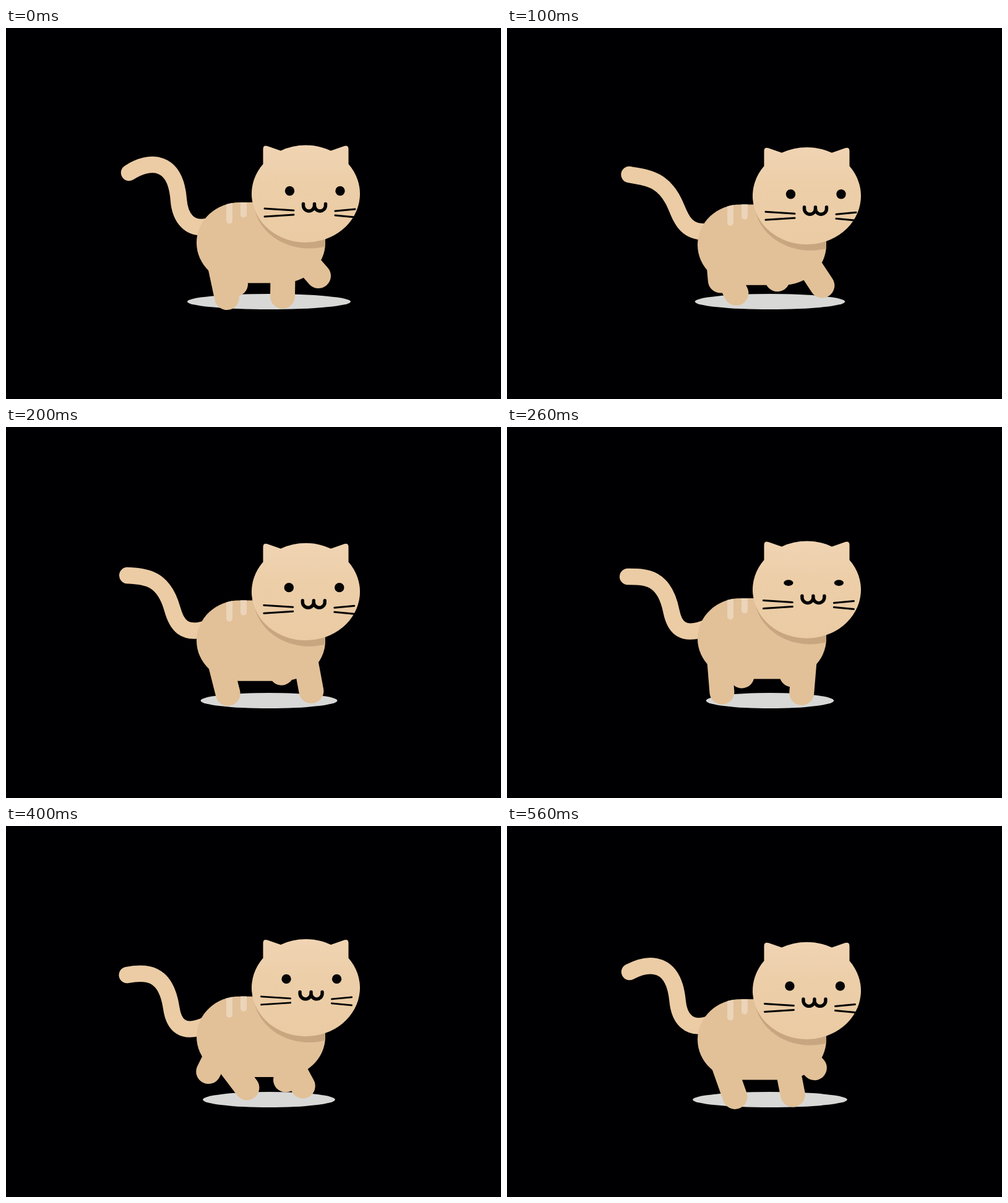
These frames come from a looping animation (800x600 px, 600 ms). An HTML page:

```html
<!DOCTYPE html>
<html lang="en">
<head>
<meta charset="utf-8">
<title>Walking cat</title>
<style>
  html, body { margin: 0; width: 100%; height: 100%; overflow: hidden; background: #000002; }
  svg { display: block; width: 100vw; height: 100vh; }
</style>
</head>
<body>
<svg viewBox="0 0 800 600">
  <defs>
    <linearGradient id="headFill" x1="0" y1="0" x2="0" y2="1">
      <stop offset="0" stop-color="#f0d4b3"/>
      <stop offset=".42" stop-color="#eccea8"/>
      <stop offset="1" stop-color="#eacba4"/>
    </linearGradient>
    <clipPath id="bodyClip"><rect x="308" y="282" width="208" height="130.5" rx="70" ry="65"/></clipPath>
  </defs>

  <ellipse id="ground" cx="425" cy="442.5" ry="12.5" fill="#d8d9d7"/>
  <path id="tail" fill="none" stroke="#ebcca5" stroke-width="26.5" stroke-linecap="round"/>
  <g id="legs" stroke="#e2c198" stroke-width="40" stroke-linecap="round"></g>

  <g id="torso">
    <g clip-path="url(#bodyClip)">
      <rect x="308" y="282" width="208" height="131" fill="#e2c199"/>
      <rect x="356" y="270" width="10" height="46.5" rx="5" fill="#ebd4b9"/>
      <rect x="379" y="270" width="10" height="36.5" rx="5" fill="#ebd4b9"/>
      <ellipse cx="490" cy="278" rx="90" ry="78.5" fill="#c8a680"/>
    </g>
    <path fill="url(#headFill)" d="M415.5 225V196Q415.5 189 422.5 191L444 198.5
      A87.5 78.5 0 0 1 525 198.5L546.5 191Q553.5 189 553.5 196V220
      A87.5 78.5 0 1 1 415.5 220Z"/>
  </g>

  <g id="face" fill="none" stroke="#040404" stroke-width="3" stroke-linecap="round">
    <g fill="#040404" stroke="none">
      <ellipse class="eye" cx="458.5" cy="263.5" rx="7.7"/>
      <ellipse class="eye" cx="540" cy="263.5" rx="7.7"/>
    </g>
    <path stroke-width="5.4" stroke-linejoin="round"
      d="M480.5 284.5V287a9 9 0 0 0 18 0V284.5V287a9 9 0 0 0 18 0V284.5"/>
    <path d="M418 292L465 295M418 305L465 302M532 296L564 293M532 303L564 306"/>
  </g>
</svg>
<script>
const LOOP = 600;    // ms
const CYCLE = 19;    // steps in a full stride; the last one is skipped
const HALF = CYCLE / 2;

// Paw paths: six points spread evenly over one stride
const hindPath = [[357, 436], [345, 404], [366, 396], [389, 420], [388, 432], [375, 439]];
const nearPath = [[505, 401], [509, 414], [491, 430], [464, 435], [453, 412], [489, 392]];
const farPath = [[447, 434], [437, 402], [447, 400], [472, 413], [480, 430], [470, 435]];

const legs = [
  { path: hindPath, hip: 342 },
  { path: hindPath, hip: 342, lag: HALF, dx: -18, dy: -6 },
  { path: nearPath, hip: 482 },
  { path: farPath, hip: 448 }
];

const $ = id => document.getElementById(id);
const set = (el, attrs) => {
  for (const name in attrs) el.setAttribute(name, attrs[name]);
};

// Straight moves between [step, value] keys
function ramp(step, ...keys) {
  let i = 1;
  while (i < keys.length - 1 && keys[i][0] < step) i++;
  const [t0, v0] = keys[i - 1], [t1, v1] = keys[i];
  return v0 + (v1 - v0) * (step - t0) / (t1 - t0);
}

// Point on a closed Catmull-Rom curve
function around(points, step) {
  const n = points.length, pos = step / CYCLE * n;
  const i = Math.floor(pos), u = pos - i;
  const [a, b, c, d] = [-1, 0, 1, 2].map(j => points[(i + j + n) % n]);
  return [0, 1].map(k => b[k] + u / 2 * (c[k] - a[k]
    + u * (2 * a[k] - 5 * b[k] + 4 * c[k] - d[k]
    + u * (3 * (b[k] - c[k]) + d[k] - a[k]))));
}

// The tail sways left once per stride, and its tip uncurls quickly
function tailPath(sway, curl, bob) {
  const inX = 254 + 20 * curl, inY = 241 - 28 * curl;
  const bendX = 279 - 16 * sway, bendY = 286 - 8 * curl + 14 * sway;
  const outX = bendX + 0.45 * (bendX - inX), outY = bendY + 0.45 * (bendY - inY);
  return `M${199 - 4.5 * sway} ${234 + 9.5 * sway}`
    + `C${223 + 10 * curl} ${242 - 30 * curl} ${inX} ${inY} ${bendX} ${bendY}`
    + `C${outX} ${outY} ${bendX + 18} ${327 + 17 * sway} 325 ${327 - 6 * curl + 0.7 * bob}`;
}

for (const leg of legs) {
  leg.el = document.createElementNS("http://www.w3.org/2000/svg", "line");
  $("legs").append(leg.el);
}
const eyes = document.querySelectorAll(".eye");

function draw(step) {
  const fromMid = Math.abs(step - HALF);
  const sway = 1 - fromMid / HALF;
  const bob = ramp(step, [0, 0], [2, 5], [10, -8.5], [CYCLE, 0]);
  const gaze = ramp(step, [0, 0], [5, 0], [10.5, -6.6], [CYCLE, 0]);
  const curl = ramp(step, [0, 1], [2.6, 0], [10, 0], [CYCLE, 1]);
  const faceY = bob + 1.75 * gaze + 0.6 * Math.max(0, bob);
  const blink = Math.min(1, 0.075 + 0.37 * fromMid);

  set($("ground"), { rx: 132 - 34.2 * sway });
  set($("tail"), { d: tailPath(sway, curl, bob) });
  set($("torso"), { transform: `translate(0 ${bob})` });
  set($("face"), { transform: `translate(${gaze} ${faceY})` });
  for (const eye of eyes) set(eye, { ry: 7.7 * blink });

  for (const { el, path, hip, lag = 0, dx = 0, dy = 0 } of legs) {
    const [x, y] = around(path, (step + lag) % CYCLE);
    const pawX = x + dx;
    set(el, { x1: hip + 0.2 * (pawX - hip), y1: 380 + bob, x2: pawX, y2: y + dy + bob });
  }
}

// Steps last 30, 30 and 40 ms in turn
function stepAt(ms) {
  const tick = Math.floor((ms % LOOP) / 10) * 10;
  return Math.floor((tick + 6.67) * 0.03);
}

const start = performance.now();
function loop() {
  draw(stepAt(performance.now() - start));
  requestAnimationFrame(loop);
}
draw(0);
requestAnimationFrame(loop);
</script>
</body>
</html>
```
